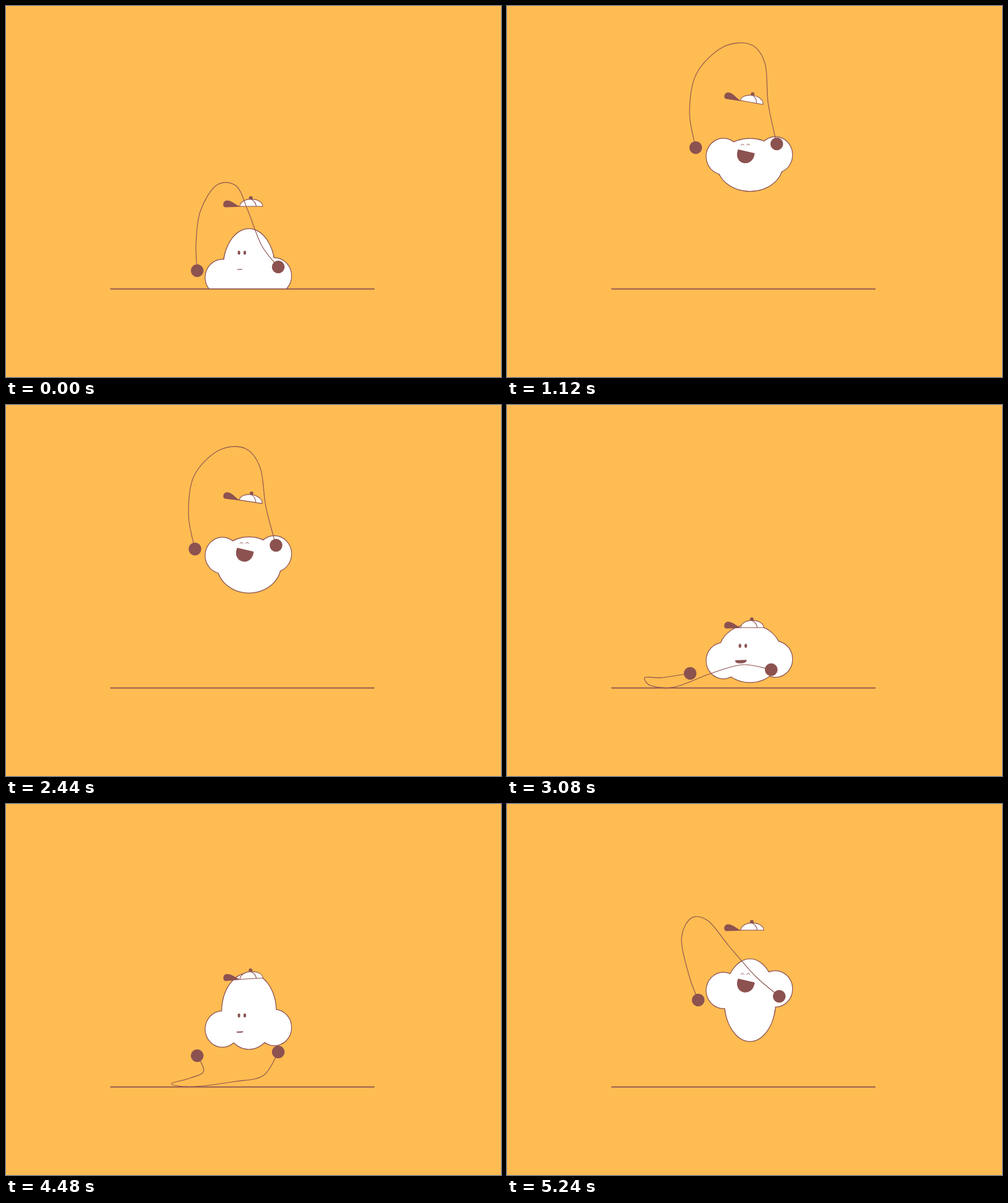
An HTML page with a canvas that plays this animation: 800x600 px, repeating every 5280 ms.

```html
<!DOCTYPE html>
<html lang="en">
<head>
<meta charset="utf-8">
<title>Skipping cloud</title>
<style>
  html, body { margin: 0; width: 100%; height: 100%; overflow: hidden; background: #ffbc52; }
  canvas { display: block; width: 800px; height: 600px; }
</style>
</head>
<body>
<canvas id="stage" width="800" height="600"></canvas>
<script>
const ctx = document.getElementById('stage').getContext('2d');
const INK = '#8c5250', PAPER = '#ffffff', SKY = '#ffbc52';
const LOOP = 2640, STEP = 40, GROUND = 457.6;
const SPAN = 131, RISE = -6; // right hand measured from the left one
const LIFT = 70;             // extra height in the middle of a jump

// Key poses: cy, ry, lobeLag, eyeOffset, mouthDepth, capY, capTilt, handX, handY
const POSE = {
  land:   [426, 66, 13, -27, 0, 324, 0, 309, 428],
  crouch: [402, 47, 11.5, -12.5, 4, 360, 0, 296, 434],
  leap:   [335, 62, 29, 7, 0.8, 282.5, -3, 309, 407],
  peak:   [257, 43, -13.7, -33, 18, 156, 10, 305, 229],
  drop:   [317.3, 67, -15.8, -42.8, 18, 204, 0, 309, 317]
};

// A rope loop thrown out by (dx, dy) from the line between the hands
function thrown(dx, dy) {
  return [1, 2, 3, 4, 5, 6].flatMap(i => {
    const s = i / 7, k = Math.sin(Math.PI * s) ** 0.7;
    return [SPAN * s + dx * k, RISE * s + dy * k];
  });
}

// Rope points as x, y pairs measured from the left hand
const ROPE = {
  over:  [-2, -43, 5, -96, 31, -138, 63, -137, 82, -97, 104, -41],
  left:  [-46, 7, -73, 6.5, -63, 20, -25, 22, 34, 0, 85, -14],
  under: [10.5, 25, -12, 36.5, -42, 45.5, -9, 50.3, 60, 42, 107, 32],
  peak:  [-10, -57, 1, -119, 43, -162, 88, -167, 112, -136, 117, -72],
  drop:  [-14, -37, -27, -97, -12, -132, 16, -128, 50, -87, 93, -38],
  swing: thrown(-135, -60),
  below: thrown(-90, 134),
  right: thrown(125, 35),
  rise:  thrown(120, -104),
  farRight: thrown(165, 35),
  farRise:  thrown(150, -104)
};

const track = (text, set) => text.trim().split(/\s+/).map(item => {
  const [time, name] = item.split(':');
  return { t: +time, v: set[name], name };
});

const bodyKeys = track(`
  0:land 440:crouch 575:leap 1120:peak 1320:drop
  1400:land 1700:crouch 1840:leap 2400:peak 2600:drop 2640:land`, POSE);

const ropeKeys = track(`
  0:over 220:swing 440:left 575:under 720:below 860:right 960:rise 1050:peak
  1120:peak 1320:drop 1500:swing 1700:left 1840:under 2000:below 2140:farRight
  2240:farRise 2330:peak 2400:peak 2600:drop 2640:over`, ROPE);

function segment(keys, t) {
  let k = 0;
  while (k < keys.length - 2 && t >= keys[k + 1].t) k++;
  return k;
}

// Slope at a key, flat at turning points so nothing overshoots
function slope(keys, k, i) {
  const a = keys[k - 1], b = keys[k], c = keys[k + 1];
  if (!a || !c || (b.v[i] - a.v[i]) * (c.v[i] - b.v[i]) <= 0) return 0;
  return (c.v[i] - a.v[i]) / (c.t - a.t);
}

function sample(keys, t) {
  const k = segment(keys, t), a = keys[k], b = keys[k + 1];
  const span = b.t - a.t, u = (t - a.t) / span, w = 1 - u;
  return a.v.map((p, i) =>
    p * (1 + 2 * u) * w * w + b.v[i] * u * u * (3 - 2 * u) +
    span * u * w * (slope(keys, k, i) * w - slope(keys, k + 1, i) * u));
}

function jumpHeight(t) {
  const k = segment(bodyKeys, t), a = bodyKeys[k], b = bodyKeys[k + 1];
  return a.name === 'leap' ? LIFT * Math.sin(Math.PI * (t - a.t) / (b.t - a.t)) : 0;
}

function ellipse(x, y, rx, ry) {
  ctx.beginPath();
  ctx.ellipse(x, y, rx, ry, 0, 0, 2 * Math.PI);
}

function dot(x, y, rx, ry = rx) {
  ellipse(x, y, rx, ry);
  ctx.fillStyle = INK;
  ctx.fill();
}

function stroke(width) {
  ctx.lineWidth = width;
  ctx.strokeStyle = INK;
  ctx.stroke();
}

function drawCloud(cx, cy, ry, lobeLag) {
  const lobeY = cy + lobeLag;
  const parts = [
    [cx, cy, 72.4 - 0.465 * ry, ry - 0.8],
    [cx - 43, lobeY, 27.3, 28.8],
    [cx + 41, lobeY - 2.5, 27.3, 28.8]
  ];
  ctx.save();
  ctx.beginPath();
  ctx.rect(0, 0, 800, GROUND);
  ctx.clip();
  for (const p of parts) { ellipse(...p); stroke(2.4); }
  ctx.fillStyle = PAPER;
  for (const p of parts) { ellipse(...p); ctx.fill(); }
  ctx.restore();
}

function drawFace(eyeY, depth) {
  const open = Math.max(0, (depth - 6) / 12);
  const eyeX = 381.2 + 4 * open;
  for (const x of [eyeX - 4.7, eyeX + 4.7]) {
    if (depth > 8) {
      ctx.beginPath();
      ctx.moveTo(x - 2.4, eyeY + 1);
      ctx.quadraticCurveTo(x, eyeY - 2.8, x + 2.4, eyeY + 1);
      stroke(1);
    } else {
      dot(x, eyeY, 2.1, 3.2);
    }
  }
  const h = (7 + 20.5 * (1 - Math.exp(-depth / 6))) / 2;
  ctx.save();
  ctx.translate(378 + 8.8 * open, eyeY + 27 - 0.86 * depth);
  ctx.rotate((15 * open - 2) * Math.PI / 180);
  ctx.beginPath();
  ctx.moveTo(-h, 0);
  ctx.bezierCurveTo(-1.25 * h, 1.36 * depth, 1.2 * h, 1.36 * depth, h, 0);
  ctx.closePath();
  ctx.fillStyle = INK;
  ctx.fill();
  stroke(1.2);
  ctx.restore();
}

function drawCap(x, y, tilt) {
  ctx.save();
  ctx.translate(x, y);
  ctx.rotate(tilt * Math.PI / 180);
  // brim
  ctx.beginPath();
  ctx.moveTo(-18, 0.3);
  ctx.bezierCurveTo(-25, -2, -31, -9.5, -39.5, -9.5);
  ctx.bezierCurveTo(-47, -9, -46.5, 1.4, -42, 1.5);
  ctx.lineTo(-18, 0.8);
  ctx.fillStyle = INK;
  ctx.fill();
  // crown
  ctx.beginPath();
  ctx.ellipse(0, 0, 18.6, 11.6, 0, Math.PI, 2 * Math.PI);
  ctx.closePath();
  ctx.fillStyle = PAPER;
  ctx.fill();
  stroke(1.1);
  ctx.beginPath();
  ctx.moveTo(-1, -11.6);
  ctx.quadraticCurveTo(7, -8.5, 8, 0);
  stroke(1.1);
  dot(-0.8, -13.8, 3, 2.7);
  ctx.restore();
}

function drawRope(x, y, offsets) {
  const pts = [[x, y]];
  for (let i = 0; i < offsets.length; i += 2) {
    pts.push([x + offsets[i], Math.min(GROUND - 0.4, y + offsets[i + 1])]);
  }
  pts.push([x + SPAN, y + RISE]);
  const at = i => pts[Math.max(0, Math.min(pts.length - 1, i))];
  ctx.beginPath();
  ctx.moveTo(x, y);
  for (let i = 0; i < pts.length - 1; i++) {
    const [a, b, c, d] = [at(i - 1), at(i), at(i + 1), at(i + 2)];
    ctx.bezierCurveTo(
      b[0] + (c[0] - a[0]) / 6, b[1] + (c[1] - a[1]) / 6,
      c[0] - (d[0] - b[0]) / 6, c[1] - (d[1] - b[1]) / 6,
      c[0], c[1]);
  }
  stroke(1.1);
  dot(x, y, 10.3);
  dot(x + SPAN, y + RISE, 10.3);
}

function drawGround() {
  ctx.beginPath();
  ctx.moveTo(169, GROUND);
  ctx.lineTo(595, GROUND);
  stroke(1.6);
}

function draw(t) {
  const [cy, ry, lobeLag, eyeOffset, depth, capY, tilt, handX, handY] = sample(bodyKeys, t);
  const lift = jumpHeight(t), cx = 392.7, bodyY = cy - lift;
  ctx.fillStyle = SKY;
  ctx.fillRect(0, 0, 800, 600);
  drawCloud(cx, bodyY, ry, lobeLag);
  drawFace(bodyY + eyeOffset, depth);
  drawGround();
  drawCap(cx + 3.7 - tilt * 0.1, capY - lift, tilt);
  drawRope(handX, handY - lift, sample(ropeKeys, t));
}

ctx.lineCap = ctx.lineJoin = 'round';
const start = performance.now();
function tick() {
  const t = Math.floor((performance.now() - start) / STEP) * STEP;
  draw(t % LOOP);
  requestAnimationFrame(tick);
}
tick();
</script>
</body>
</html>
```
